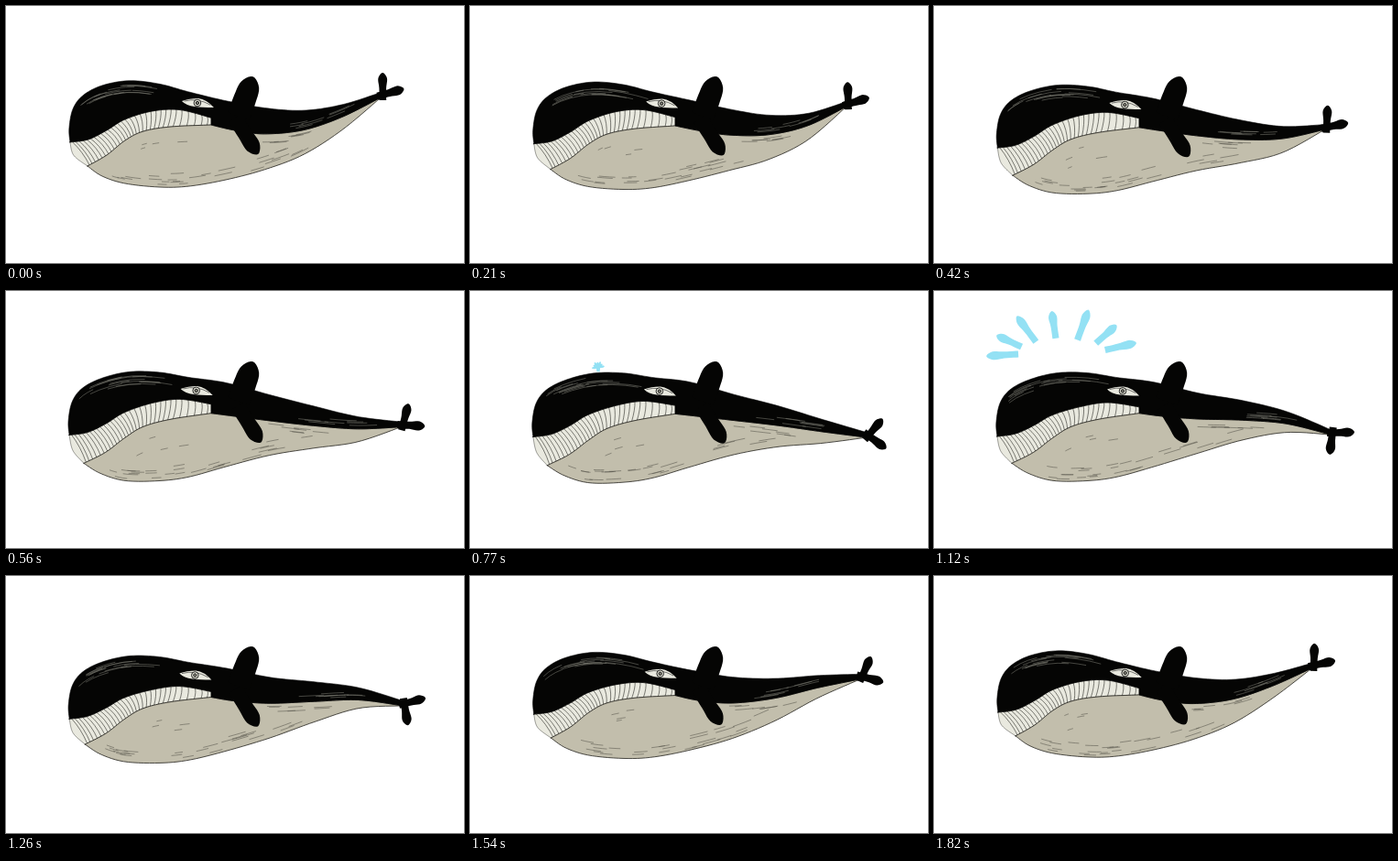
These frames come from a looping animation (500x281 px, 1890 ms). An HTML page:

```html
<!DOCTYPE html>
<html lang="en">
<head>
<meta charset="utf-8">
<title>Whale</title>
<style>
html, body { margin: 0; width: 100%; height: 100%; overflow: hidden; background: #fff; }
svg { display: block; width: 100%; height: 100%; }
path { stroke-linejoin: round; stroke-linecap: round; }
</style>
</head>
<body>
<svg viewBox="0 0 500 281" preserveAspectRatio="none">
  <path id="spout" fill="#93e1f4"/>
  <path id="baleen" fill="#e9e9df" stroke="#33332c" stroke-width=".5"/>
  <path id="hatch" fill="none" stroke="#2b2b25" stroke-width=".6"/>
  <path id="belly" fill="#c2beac" stroke="#24231d" stroke-width=".8"/>
  <path id="bellyMarks" fill="none" stroke="#55534a" stroke-width=".55"/>
  <path id="black" fill="#050504" stroke="#050504" stroke-width=".6"/>
  <path id="blackMarks" fill="none" stroke="#7c7c72" stroke-width=".55"/>
  <path id="limbs" fill="#050504"/>
  <g id="eye">
    <path d="M-17 -2Q-9 -5 1 -5Q10 -4 18 5Q5 5 -3 4Q-12 3 -17 -2Z" fill="#e9e9df"/>
    <path d="M-14 -2Q0 -6 14 2" fill="none" stroke="#222" stroke-width=".6"/>
    <circle r="3.8" fill="#dcdccf" stroke="#111" stroke-width=".9"/>
    <circle r="1.6" fill="#8d8c80" stroke="#111"/>
  </g>
</svg>
<script>
const LOOP = 1890, STEP = 70;

// Key points of the whale with its tail raised
const backHead = [[70, 148], [69, 133], [73, 112], [84, 97], [105, 86], [135, 81], [168, 85], [200, 94], [240, 104]];
const lipLine = [[70, 148], [90, 145], [110, 135], [130, 123], [160, 114], [190, 113], [224, 122]];
const jawLine = [[89, 175], [110, 163], [130, 147], [150, 137], [180, 132], [224, 130]];
const bellyFront = [[89, 175], [105, 186], [130, 194], [168, 198], [200, 197], [240, 190]];

const clamp = (v, lo, hi) => Math.min(hi, Math.max(lo, v));
const el = id => document.getElementById(id);
const setPath = (id, d) => el(id).setAttribute('d', d);
const poly = pts => 'M' + pts.map(p => p[0].toFixed(2) + ' ' + p[1].toFixed(2)).join('L');
const closed = (...curves) => poly(curves.flat()) + 'Z';

function random(seed) {
  let s = seed * 7919 + 17;
  return (lo, hi) => {
    s = (s * 16807) % 2147483647;
    return lo + (hi - lo) * s / 2147483647;
  };
}

// Point on a Catmull-Rom curve, u from 0 to 1
function at(pts, u) {
  const last = pts.length - 1, x = clamp(u, 0, 1) * last, i = Math.min(last - 1, Math.floor(x)), f = x - i;
  const p = k => pts[clamp(k, 0, last)];
  return [0, 1].map(c => {
    const [a, b, d, e] = [p(i - 1)[c], p(i)[c], p(i + 1)[c], p(i + 2)[c]];
    return b + f * (d - a + f * (2 * a - 5 * b + 4 * d - e + f * (3 * (b - d) + e - a))) / 2;
  });
}
const smooth = (pts, n = 60) => Array.from({ length: n + 1 }, (_, i) => at(pts, i / n));
const reversed = pts => smooth(pts).reverse();

// Short pen stroke that runs along a curve at a given depth
function mark(curve, u, length, depth) {
  return poly([0, .33, .67, 1].map(k => {
    const [x, y] = at(curve, u + k * length);
    return [x, y + depth];
  }));
}

// Rounded paddle, used for fins, flukes and water
function lobe(x, y, angle, length, width, base = .8) {
  const dx = Math.cos(angle), dy = Math.sin(angle);
  const p = (k, w) => [x + dx * k * length - dy * w * width, y + dy * k * length + dx * w * width];
  return closed(smooth([p(-.25, base), p(.3, base), p(.75, 1), p(1, 0), p(.75, -1), p(.3, -base), p(-.25, -base)], 30));
}

// Grows out of the blowhole, then its fingers fly apart
function spout(t) {
  const size = (t - 700) / 280;
  if (size <= 0 || size > 1.5) return '';
  const grow = Math.min(size, 1), drift = Math.max(size - 1, 0);
  const x = 140, y = 89 - 21 * grow;
  let d = '';
  for (let i = 0; i < 7; i++) {
    const a = Math.PI * (.98 + i * .158);
    d += lobe(x + Math.cos(a) * drift * 110, y + Math.sin(a) * drift * 45, a, (i % 2 ? 24 : 28) * grow, 4.5 * grow);
  }
  for (let i = -1; i < 2 && !drift; i++) d += lobe(x + i * 3 * grow, y, Math.PI / 2 - i * .1, 20 * grow, 2.2 * grow, 2);
  return d;
}

function draw(t) {
  const turn = 2 * Math.PI * t / LOOP;
  const phase = turn + .14 * (1 - Math.cos(2 * turn));
  const wave = (mean, amp, lag = 0) => mean - amp * Math.cos(phase - lag);

  const pitch = wave(7.3, 6.3), drop = wave(8, 8.1, -.18), lip = wave(3.6, 3.6, .5);
  const flip = wave(.5, .5, .7) ** 2;
  const tailX = 433 - 26 * wave(.5, -.5, .35) ** 3;

  const nod = ([x, y]) => {
    const w = clamp((205 - x) / 100, -1, .9);
    return [x - pitch * .1 * Math.max(w, 0), y + pitch * w];
  };
  const open = ([x, y]) => [
    x - drop * .3 * clamp((120 - x) / 30, 0, 1),
    y + drop * clamp((260 - x) / 130, 0, 1)
  ];
  // the swing travels along the body and grows toward the tail
  const rear = (heights, lead) => heights.map((h, i) => {
    const u = (i + 1) / 4;
    return [240 + (tailX - 240) * u, wave(h, 32 * u ** 2.2, -lead * (1 - u))];
  });

  const back = [...backHead.map(nod), ...rear([112, 119, 123.5, 126.5], 1.6)];
  const lips = lipLine.map(nod).map(([x, y]) => [x, y + lip * clamp((x - 100) / 60, 0, 1)]);
  const jaw = jawLine.map(open);
  const under = [jaw.at(-1), open([250, 136]), ...rear([140.4, 140.5, 137, 132], 1.6)];
  const belly = [...bellyFront.map(open), ...rear([178.5, 165, 149.5, 132], 2.4)];
  const chin = [lips[0], [lips[0][0] + 4, lips[0][1] * .45 + jaw[0][1] * .55], jaw[0]];

  setPath('black', closed(smooth(back, 100), reversed(under), reversed(lips)));
  setPath('belly', closed(smooth(belly), reversed(under), reversed(jaw)));
  setPath('baleen', closed(smooth(lips), reversed(jaw), reversed(chin)));

  let hatch = '';
  for (let i = 1; i < 32; i++) {
    const a = at(lips, i / 32), b = at(jaw, i / 32);
    hatch += `M${a}Q${(a[0] + b[0]) / 2 + 2} ${(a[1] + b[1]) / 2 - 2} ${b}`;
  }
  setPath('hatch', hatch);

  const rnd = random(Math.round(t / STEP) + 1);
  const marks = (count, curve, from, to, length, top, bottom) => Array.from({ length: count },
    () => mark(curve, rnd(from, to), rnd(.5, 1) * length, rnd(top, bottom))).join('');
  setPath('blackMarks', marks(15, back, .23, .46, .11, 4, 14) + marks(8, under, .5, .78, .12, -9, -3));
  setPath('bellyMarks', marks(26, belly, .13, .75, .05, -16, -2) +
    marks(7, under, .38, .65, .09, 3, 10) + marks(4, jaw, .5, .85, .06, 12, 32));

  const finAngle = Math.atan2(wave(35, 2, -.3), wave(22, 1, -.8));
  const rootX = tailX + 2, rootY = wave(129.5, 32.5);
  setPath('limbs', lobe(257, 112, -1.22, 37, 10.3, 1.2) +
    lobe(wave(256, 2, -.8), wave(132, 2, -.3), finAngle, 38, 8, 1) +
    lobe(rootX, rootY, -1.6 + 1.57 * flip, 24, 4.8) +
    lobe(rootX, rootY, -.3 + 2 * flip, 24, 5));

  el('eye').setAttribute('transform', `translate(${wave(207.6, -1.6, .6)} ${wave(107.9, 1.9)})`);
  setPath('spout', spout(t));
}

const start = performance.now();
function tick() {
  const t = (performance.now() - start) % LOOP;
  draw(Math.floor(t / STEP) * STEP);
  requestAnimationFrame(tick);
}
tick();
</script>
</body>
</html>
```
